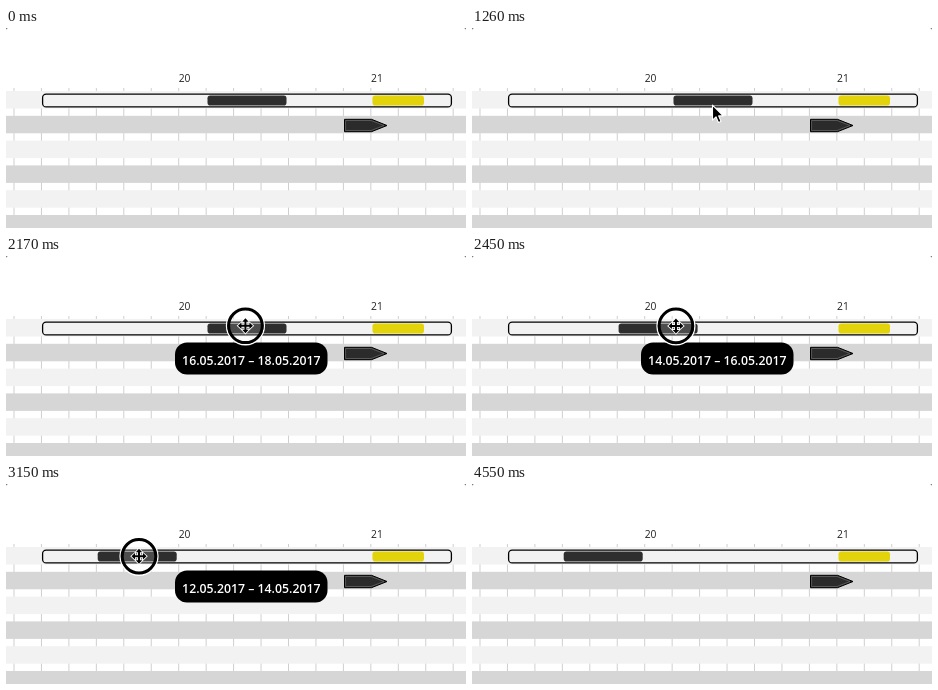
Animation, 460 px wide and 200 px high, one loop 5.88 s. Source, as an HTML page:

```html
<!DOCTYPE html>
<html lang="fi">
<head>
<meta charset="utf-8">
<title>Aikajana</title>
<style>
  html, body { margin: 0; width: 100%; height: 100%; overflow: hidden; background: #fff; }
  svg { display: block; width: 460px; height: 200px; }
  text { font-family: "Open Sans", "Noto Sans", sans-serif; }
  .week { font-size: 10.3px; fill: #222; }
  .tip { font-size: 12.3px; font-weight: 600; fill: #fff; text-anchor: middle; }
</style>
</head>
<body>
<svg viewBox="0 0 460 200">
  <rect width="460" height="200" fill="#666"/>
  <rect width="460" height="200" rx="2.5" fill="#fff"/>
  <g id="ticks" stroke="#cfcfcf"></g>
  <g id="rows"></g>
  <text class="week" x="172.7" y="54">20</text>
  <text class="week" x="365" y="54">21</text>

  <rect x="36.6" y="66.1" width="408.8" height="12.8" rx="3.5" fill="#f2f2f2" stroke="#000" stroke-width="1.3"/>
  <rect id="bar" y="67.5" width="79" height="10" rx="2.8" fill="#2e2e2e"/>
  <rect x="366.5" y="67.5" width="51.5" height="10" rx="2.8" fill="#e2d30a"/>
  <path d="M338.5 91.3H365.5L381 97.5L365.5 103.7H338.5Z" fill="#2b2b2b" stroke="#000"/>
  <path d="M339.6 92.5H365.2L378 97.5L365.2 102.5H339.6Z" fill="none" stroke="#777" stroke-width=".6"/>

  <g id="tip">
    <rect id="tipBox" y="86.5" height="32" rx="12"/>
    <text id="tipText" class="tip" y="108.7"></text>
  </g>

  <g id="cursor">
    <g id="ring">
      <circle r="17" fill="#fff" fill-opacity=".15"/>
      <circle r="18.9" fill="none" stroke="#fff" stroke-width="1.4"/>
      <circle r="16.8" fill="none" stroke="#000" stroke-width="3"/>
    </g>
    <path id="move" stroke="#fff" stroke-width="1.7" paint-order="stroke"
      d="M0-7.5L3.2-4H1V-1H4V-3.2L7.5 0L4 3.2V1H1V4H3.2L0 7.5L-3.2 4H-1V1H-4V3.2L-7.5 0L-4-3.2V-1H-1V-4H-3.2Z"/>
    <path id="arrow" stroke="#fff" stroke-width="1.1" stroke-linejoin="round"
      d="M.5.6V15.6L4 12.3L6.4 18L9 16.9L6.6 11.4H11.2Z"/>
  </g>
</svg>
<script>
const LOOP = 5880, STEP = 70, DAY = 27.45;
const el = id => document.getElementById(id);
const clamp = v => Math.min(1, Math.max(0, v));
const span = (t, a, b) => clamp((t - a) / (b - a));
const mix = (a, b, p) => a + (b - a) * p;
const sine = p => (1 - Math.cos(Math.PI * p)) / 2;
const smooth = p => p * p * (3 - 2 * p);

function add(parent, tag, attrs) {
  const node = document.createElementNS("http://www.w3.org/2000/svg", tag);
  set(node, attrs);
  parent.appendChild(node);
}
function set(node, attrs) {
  for (const k in attrs) node.setAttribute(k, attrs[k]);
}
const show = (node, on) => set(node, { visibility: on ? "visible" : "hidden" });

for (let i = 0; i < 17; i++) {
  const x = 8 + i * DAY;
  add(el("ticks"), "line", { x1: x, x2: x, y1: 60, y2: 200 });
}
for (let i = 0; i < 6; i++) {
  add(el("rows"), "rect", {
    y: 63 + i * 24.8, width: 460, height: 17.5, fill: i % 2 ? "#d6d6d6" : "#f2f2f2"
  });
}

// Pointer position for each phase: enter, hover, drag, leave
function pointer(t) {
  if (t < 1330) {
    const p = sine(span(t, 630, 1260));
    return [mix(191, 240, p), mix(203, 76.5, p)];
  }
  if (t < 2030) {
    const p = span(t, 1260, 1540);
    return [mix(240, 247, smooth(p)), mix(76.5, 71.5, p) - 6 * Math.sin(Math.PI * p)];
  }
  if (t < 4130) {
    const u = span(t, 2030, 3150);
    return [
      mix(247, 133, smooth(u ** 0.89)),
      71.5 + 0.8 * u - 2 * Math.sin(Math.PI * Math.sqrt(u))
    ];
  }
  const p = sine(span(t, 4130, 4550));
  return [mix(133, 162, p), mix(72.3, 206, p)];
}

function render(t) {
  const [x, y] = pointer(t);
  const dragging = t >= 1960 && t < 3570;
  const moved = t < 2030 ? 0 : Math.round((247 - pointer(Math.min(t, 3150))[0]) / DAY);
  const days = t > 3150 ? 4 : moved;
  set(el("bar"), { x: 201.5 - days * DAY });

  const shift = dragging ? days : 0;
  const dates = `${16 - shift}.05.2017 – ${18 - shift}.05.2017`;
  el("tipText").textContent = dragging ? dates : "Päällystys: " + dates;
  set(el("tipText"), { x: dragging ? 245.3 : 240.7 });
  set(el("tipBox"), dragging ? { x: 169, width: 152.5 } : { x: 125, width: 232 });
  set(el("tip"), { opacity: Math.min(span(t, 1260, 1610), 1 - span(t, 4130, 4480)) });

  const moving = t >= 1330 && (t < 4130 || y < 79);
  set(el("cursor"), { transform: `translate(${x} ${y})` });
  show(el("cursor"), t >= 700 && t < 4550);
  show(el("move"), moving && t < 4550);
  show(el("arrow"), !moving && t >= 700 && t < 4550);
  const press = t < 1890 || t >= 3640 ? 0 : t < 1960 ? 0.88 : t < 3570 ? 1 : 0.5;
  set(el("ring"), { opacity: press });
}

const start = performance.now();
function tick(now) {
  const t = Math.max(0, now - start) % LOOP;
  render(Math.floor(t / STEP) * STEP);
  requestAnimationFrame(tick);
}
render(0);
requestAnimationFrame(tick);
</script>
</body>
</html>
```
